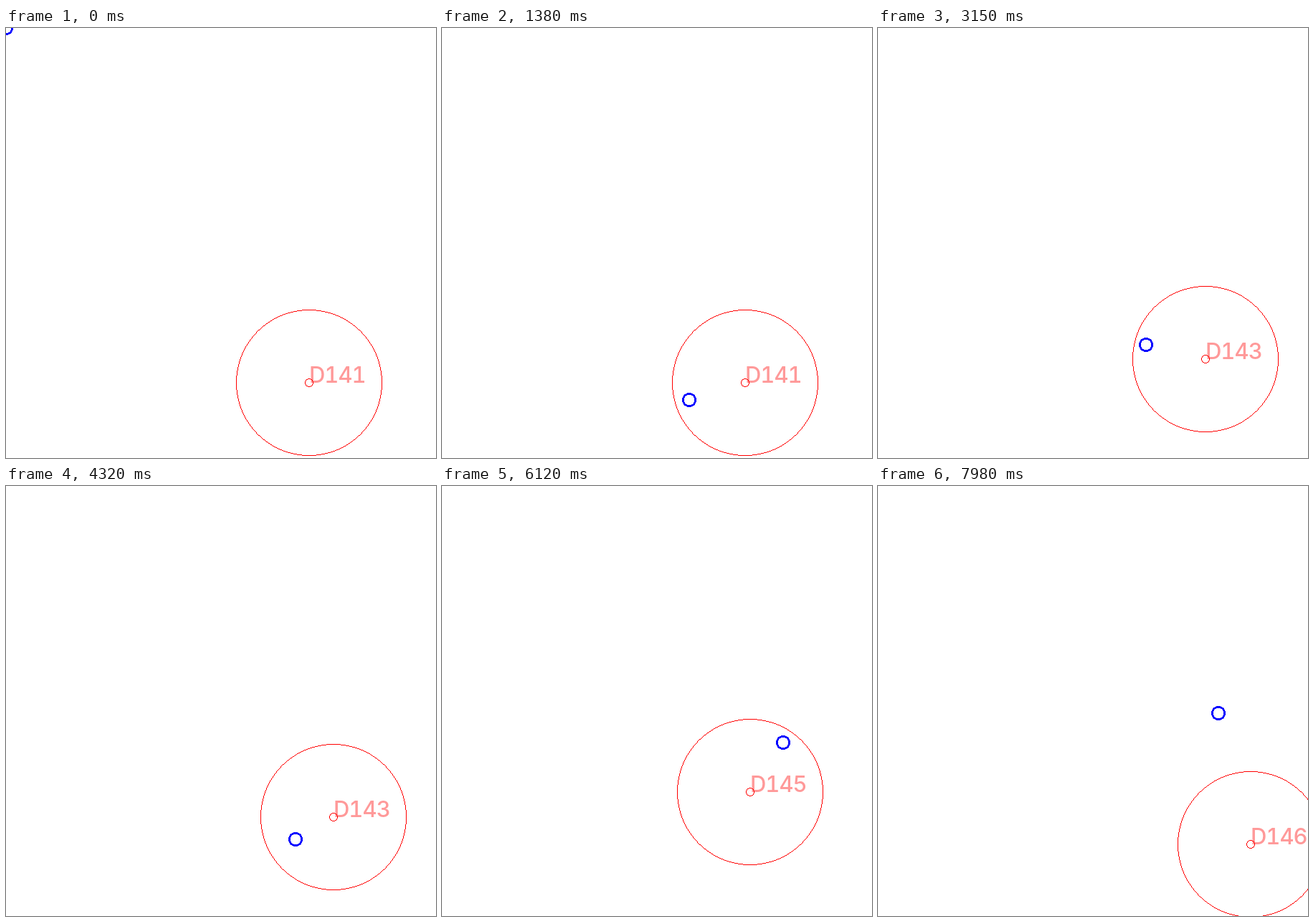
An HTML page that plays this animation: 600x600 px, repeating every 8000 ms.

```html
<!DOCTYPE html>
<html lang="en">
<head>
<meta charset="utf-8">
<title>Target runs</title>
<style>
  html, body { margin: 0; width: 100%; height: 100%; overflow: hidden; background: #fff; }
  svg { display: block; width: 100vw; height: 100vh; }
  path { fill: none; stroke: #f00; shape-rendering: crispEdges; }
  circle { fill: none; stroke: #00f; stroke-width: 2.8; shape-rendering: crispEdges; }
  text {
    font: 500 31px Inter, "DejaVu Sans", sans-serif;
    font-variant-numeric: tabular-nums;
    letter-spacing: -1px;
    fill: #f99;
  }
</style>
</head>
<body>
<svg viewBox="0 0 600 600">
  <g id="target">
    <text></text>
    <path></path>
  </g>
  <circle id="ball" r="8.7"/>
</svg>
<script>
const LOOP = 8000, STEP = 30, RUN = 1450, FIRST = 141, SWING = 30;

// The ball drifts from one point to another, swinging once on the way.
const runs = [
  { target: [423, 495], from: [465, 579], to: [330, 507] },
  { target: [511, 489], from: [421, 331], to: [561, 431] },
  { target: [457, 462], from: [400, 464], to: [399, 488] },
  { target: [449, 463], from: [431, 341], to: [501, 201] },
  { target: [430, 427], from: [544, 397], to: [356, 349] },
  { target: [520, 500], from: [350, 241], to: [603, 395] }
];

const target = document.getElementById("target");
const label = target.querySelector("text");
const ball = document.getElementById("ball");

// A circle outline one pixel thick, mirrored from one eighth.
function pixelCircle(radius) {
  let d = "";
  for (let a = 0.5; a <= radius * Math.SQRT1_2; a++) {
    const b = Math.floor(Math.sqrt((radius - 0.5) ** 2 - a * a)) + 0.5;
    for (const [x, y] of [[a, b], [b, a]])
      for (const sx of [-1, 1])
        for (const sy of [-1, 1]) d += `M${sx * x - 0.5} ${sy * y}h1`;
  }
  return d;
}

function position({ from, to }, ms) {
  if (ms < STEP) return [0, 0];
  const u = ms / RUN;
  const swing = SWING * Math.sin(2 * Math.PI * u);
  return from.map((start, axis) => Math.round(start + (to[axis] - start) * u - swing));
}

function draw(ms) {
  const time = Math.floor((ms % LOOP) / STEP) * STEP;
  const index = Math.floor(time / RUN);
  const start = Math.ceil(index * RUN / STEP) * STEP;
  const [x, y] = position(runs[index], time - start);
  target.setAttribute("transform", `translate(${runs[index].target})`);
  label.textContent = "D" + (FIRST + index);
  ball.setAttribute("cx", x);
  ball.setAttribute("cy", y);
}

let begin;
function tick(now) {
  begin ??= now;
  draw(now - begin);
  requestAnimationFrame(tick);
}

target.querySelector("path").setAttribute("d", pixelCircle(102) + pixelCircle(6));
draw(0);
requestAnimationFrame(tick);
</script>
</body>
</html>
```
